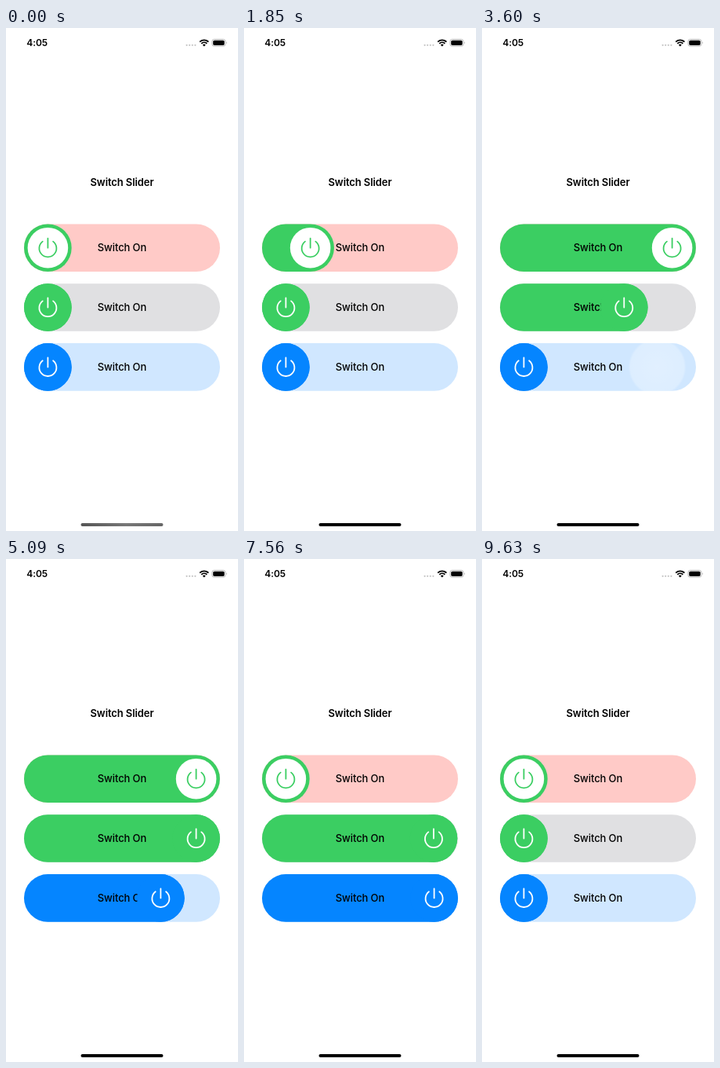
These frames come from a looping animation (296 px wide and 640 px high, 9680 ms). An HTML page:

```html
<!DOCTYPE html>
<html lang="en">
<head>
<meta charset="utf-8">
<title>Switch Slider</title>
<style>
  html, body { margin: 0; width: 100%; height: 100%; overflow: hidden; background: #fff; }
  svg { display: block; width: 100%; height: 100%; }
  text { font-family: Inter, "Liberation Sans", sans-serif; font-size: 13px; letter-spacing: -0.1px; text-anchor: middle; fill: #000; }
</style>
</head>
<body>
<svg id="stage" viewBox="0 0 296 640">
  <defs>
    <radialGradient id="glow">
      <stop offset="0" stop-color="#fff" stop-opacity=".36"/>
      <stop offset=".92" stop-color="#fff" stop-opacity=".28"/>
      <stop offset="1" stop-color="#fff" stop-opacity="0"/>
    </radialGradient>
    <linearGradient id="dim">
      <stop offset="0" stop-color="#555"/>
      <stop offset=".55" stop-color="#777"/>
      <stop offset="1" stop-color="#666"/>
    </linearGradient>
    <clipPath id="pill"><rect x="23" y="-30.3" width="250" height="60.6" rx="30.3"/></clipPath>
  </defs>

  <text x="39.7" y="23" style="font-size:12px;font-weight:600">4:05</text>
  <g fill="#c4c4c4">
    <circle cx="230.6" cy="21.8" r="1.1"/><circle cx="234.2" cy="21.8" r="1.1"/>
    <circle cx="237.8" cy="21.8" r="1.1"/><circle cx="241.4" cy="21.8" r="1.1"/>
  </g>
  <g fill="none" stroke="#000" stroke-width="1.8">
    <path d="M247.2 17.6A8.2 8.2 0 0 1 258.4 17.6"/>
    <path d="M249.3 19.8A5 5 0 0 1 256.3 19.8"/>
  </g>
  <path d="M252.8 23.4L250.9 21.5A2.7 2.7 0 0 1 254.7 21.5Z"/>
  <rect x="262.9" y="14.4" width="17" height="8.8" rx="2.7" fill="none" stroke="#aaa" stroke-width=".8"/>
  <rect x="264.2" y="15.7" width="14.4" height="6.2" rx="1.6"/>
  <path d="M281 17.2Q282.6 18.8 281 20.4Z" fill="#aaa"/>

  <text x="148" y="200.7" font-weight="600">Switch Slider</text>
  <g id="sliders"></g>
  <rect id="home" x="95.5" y="630" width="105" height="4" rx="2"/>
</svg>
<script>
const LOOP = 9680, LEFT = 53.4, RIGHT = 242.6, R = 30.3;
const GREEN = '#3bce62', BLUE = '#0585ff';
const home = document.getElementById('home');

// Drag paths as [ms, knob x].
const sliders = [
  { y: 279.7, track: '#ffcac7', fill: GREEN, knob: '#fff', knobR: 25.8, icon: GREEN,
    path: [[1660, LEFT], [1840, 82], [2060, 165], [2290, 231], [2430, 240], [2780, 240.4], [2860, RIGHT],
           [6230, RIGHT], [6400, 205], [6550, 130], [6700, 75], [6880, 55], [7500, 54.6], [7560, LEFT]] },
  { y: 355.5, track: '#e0e0e2', fill: GREEN, knob: GREEN, knobR: R, icon: '#fff',
    path: [[3200, LEFT], [3360, 88], [3600, 181], [3800, 224], [4000, 239], [4120, RIGHT],
           [7530, RIGHT], [7560, 242], [7680, 190], [7780, 103], [7950, 62], [8290, LEFT]] },
  { y: 431.4, track: '#d0e7ff', fill: BLUE, knob: BLUE, knobR: R, icon: '#fff',
    path: [[4820, LEFT], [4980, 120], [5090, 197], [5220, 232], [5500, RIGHT],
           [8800, RIGHT], [8950, 215], [9100, 150], [9250, 90], [9400, 62], [9630, LEFT]] }
];

function add(parent, tag, attrs) {
  const el = document.createElementNS('http://www.w3.org/2000/svg', tag);
  for (const key in attrs) el.setAttribute(key, attrs[key]);
  return parent.appendChild(el);
}

for (const s of sliders) {
  const g = add(document.getElementById('sliders'), 'g', { transform: `translate(0 ${s.y})` });
  const bar = { x: 23, y: -R, height: 2 * R, rx: R };
  add(g, 'rect', { ...bar, width: 250, fill: s.track });
  s.bar = add(g, 'rect', { ...bar, fill: s.fill });
  add(g, 'text', { x: 148, y: 4.7, 'font-weight': 500 }).textContent = 'Switch On';
  s.handle = add(g, 'g', {});
  add(s.handle, 'circle', { r: s.knobR, fill: s.knob });
  add(s.handle, 'path', {
    d: 'M-6.7 -8.1A11 11 0 1 0 6.7 -8.1M0 -12V0',
    fill: 'none', stroke: s.icon, 'stroke-width': 1.8, 'stroke-linecap': 'round'
  });
  const clip = add(g, 'g', { 'clip-path': 'url(#pill)' });
  s.glow = add(clip, 'circle', { r: 37, fill: 'url(#glow)' });
}

const slope = (a, b) => (b[1] - a[1]) / (b[0] - a[0]);

// Monotone tangent: harmonic mean of neighbouring slopes.
function tangent(p, i) {
  if (i === 0 || i === p.length - 1) return 0;
  const a = slope(p[i - 1], p[i]), b = slope(p[i], p[i + 1]);
  return a * b > 0 ? 2 * a * b / (a + b) : 0;
}

function follow(p, t) {
  const last = p.length - 1;
  if (t <= p[0][0]) return p[0][1];
  if (t >= p[last][0]) return p[last][1];
  let i = 0;
  while (t >= p[i + 1][0]) i++;
  const [t0, x0] = p[i], [t1, x1] = p[i + 1];
  const d = t1 - t0, u = (t - t0) / d, v = 1 - u;
  return x0 * v * v * (1 + 2 * u) + x1 * u * u * (3 - 2 * u)
    + d * (tangent(p, i) * u * v * v - tangent(p, i + 1) * u * u * v);
}

function draw(t) {
  const sweep = t < 2000 ? 196 + 0.584 * (t - 1080) : 223 + 0.584 * (t - 3600);
  const sweeping = sweep > -14 && sweep < 310;
  for (const s of sliders) {
    const x = follow(s.path, t);
    s.bar.setAttribute('width', x + R - 23);
    s.handle.setAttribute('transform', `translate(${x} 0)`);
    s.glow.setAttribute('cx', sweep);
    s.glow.setAttribute('visibility', sweeping && t < s.path[0][0] ? 'visible' : 'hidden');
  }
  home.setAttribute('fill', t < 1720 ? 'url(#dim)' : '#000');
}

const start = performance.now();
function tick() {
  draw((performance.now() - start) % LOOP);
  requestAnimationFrame(tick);
}
tick();
</script>
</body>
</html>
```
